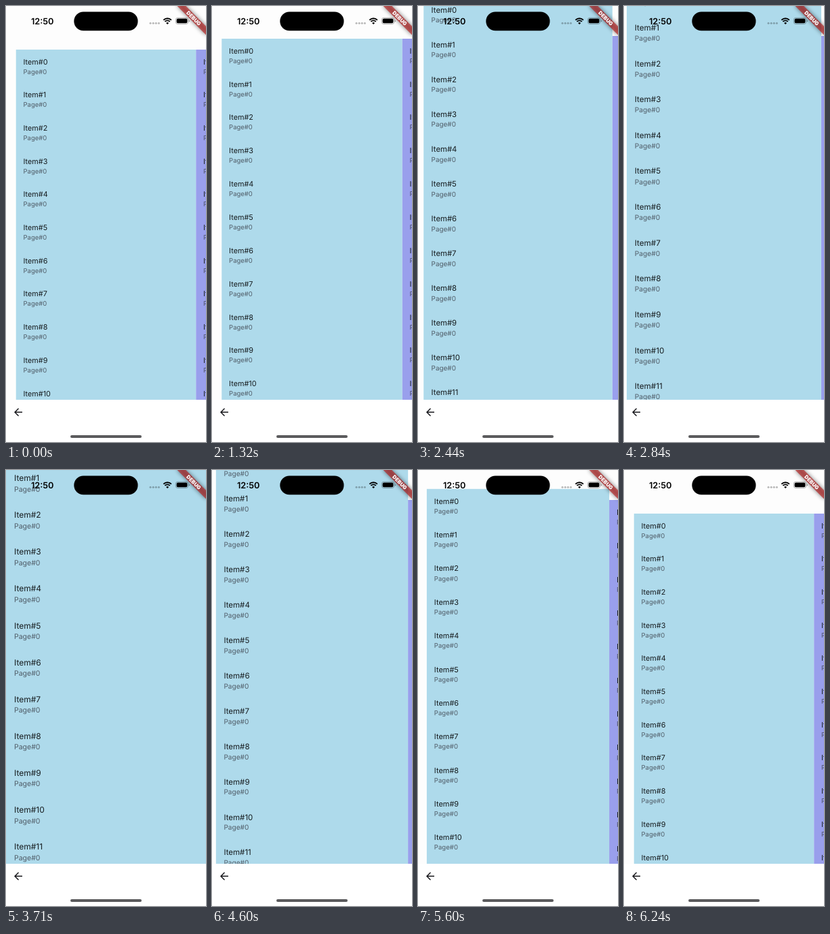
Write an HTML page that moves like this. It is 295 by 640 pixels and loops after 6.28 s.

```html
<!DOCTYPE html>
<html lang="en">
<head>
<meta charset="utf-8">
<title>Expanding pages</title>
<style>
  html, body { margin: 0; width: 100%; height: 100%; overflow: hidden; background: #fdfdfd; }
  svg { display: block; width: 295px; height: 640px; }
  text { font-family: Inter, Roboto, sans-serif; text-rendering: geometricPrecision; }
  .title { font-size: 12px; fill: #171d20; }
  .sub { font-size: 10.5px; fill: #3a3f49; fill-opacity: .8; }
  .clock { font-size: 12.7px; font-weight: 600; text-anchor: middle; }
  .debug { font-size: 7.65px; font-weight: 900; fill: #fff; text-anchor: middle; }
</style>
</head>
<body>
<svg viewBox="0 0 295 640">
  <defs>
    <filter id="soft" x="-20%" y="-150%" width="140%" height="400%">
      <feGaussianBlur stdDeviation="3"/>
    </filter>
  </defs>

  <g id="pages"></g>

  <!-- bottom bar -->
  <rect y="578" width="295" height="62" fill="#fff"/>
  <path transform="translate(9 587.3) scale(.75)" fill="#1b1b1f"
    d="M20 11H7.83l5.59-5.59L12 4l-8 8 8 8 1.41-1.41L7.83 13H20z"/>
  <rect x="95" y="630" width="105" height="4" rx="2" fill="#5b5b5d"/>

  <!-- status bar -->
  <text class="clock" x="53.7" y="26.5">12:50</text>
  <rect x="100.3" y="8.5" width="94.2" height="27.8" rx="13.9"/>
  <g fill-opacity=".27">
    <circle cx="213" cy="25.3" r="1.5"/>
    <circle cx="217.2" cy="25.3" r="1.5"/>
    <circle cx="221.3" cy="25.3" r="1.5"/>
    <circle cx="225.4" cy="25.3" r="1.5"/>
  </g>
  <g fill="none" stroke="#000" stroke-width="1.9">
    <path d="M232.3 20.6A8.2 8.2 0 0 1 243.9 20.6"/>
    <path d="M234.4 22.9A5.2 5.2 0 0 1 241.8 22.9"/>
  </g>
  <path d="M238.1 27L236.1 24.9A2.9 2.9 0 0 1 240.1 24.9Z"/>
  <rect x="250.3" y="17.3" width="18.4" height="9.2" rx="3" fill="none" stroke="#000" stroke-opacity=".38" stroke-width=".8"/>
  <rect x="251.6" y="18.6" width="15.8" height="6.6" rx="1.9"/>
  <path d="M269.7 20.4q1.3 .5 1.3 1.5t-1.3 1.5z" fill-opacity=".42"/>

  <!-- corner ribbon -->
  <g transform="translate(295 0) rotate(45)">
    <rect x="-30" y="21" width="60" height="9" fill-opacity=".5" filter="url(#soft)"/>
    <rect x="-30" y="21" width="60" height="9" fill="#b71c1c" fill-opacity=".627"/>
    <text class="debug" y="28.3">DEBUG</text>
  </g>
</svg>

<script>
const W = 295, ROW = 54.1, REST = 64, TRAVEL = 126, SAFE_TOP = 44;
const LOOP = 6280, STEP = 102;

// [ms, scroll distance]
const path = [
  [0, 0], [1002, 0], [1104, 4], [1308, 16], [1716, 50], [1920, 59.5],
  [2430, 77], [2838, 104], [3144, 119], [3654, 126], [4182, 126],
  [4284, 122], [4896, 64], [5100, 53], [5610, 32], [6120, 4], [6222, 0], [LOOP, 0]
];

function makePage(index, color) {
  let rows = "";
  for (let i = 0; i < 14; i++) {
    const y = i * ROW;
    rows += `<text class="title" x="12" y="${y + 24}">Item#${i}</text>` +
            `<text class="sub" x="12" y="${y + 39.5}">Page#${index}</text>`;
  }
  const page = document.createElementNS("http://www.w3.org/2000/svg", "g");
  page.innerHTML = `<rect width="${W}" height="${14 * ROW}" fill="${color}"/>` + rows;
  document.getElementById("pages").append(page);
  return page;
}

const first = makePage(0, "#aedaeb");
const second = makePage(1, "#999fec");

function scrollAt(t) {
  const i = path.findIndex(p => p[0] > t);
  const [t0, a] = path[i - 1], [t1, b] = path[i];
  return a + (b - a) * (t - t0) / (t1 - t0);
}

// The picture advances in steps, restarted for each drag.
function stepped(t) {
  const start = t >= 4284 ? 4284 : 1104;
  return t < start ? 0 : start + Math.floor((t - start) / STEP) * STEP;
}

function place(page, x, y, s) {
  page.setAttribute("transform", `translate(${x} ${y}) scale(${s})`);
}

function draw(t) {
  const d = scrollAt(stepped(t));
  const s = 0.9 + 0.1 * Math.pow(d / TRAVEL, 1.67);
  const left = W * (1 - s) / 2, top = REST - d;
  place(first, left, top, s);
  place(second, left + W * s, Math.max(SAFE_TOP, top), s);
}

const begin = performance.now();
function tick() {
  draw((performance.now() - begin) % LOOP);
  requestAnimationFrame(tick);
}
tick();
</script>
</body>
</html>
```
